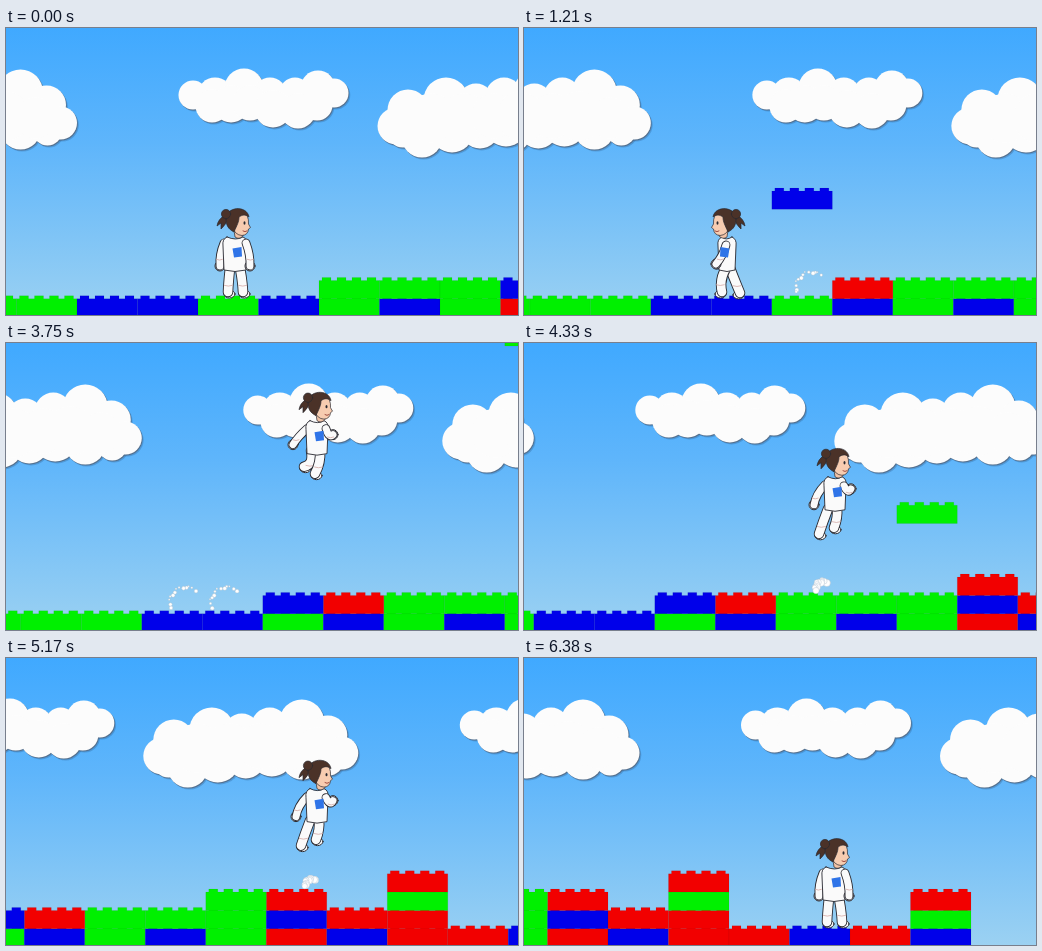
Animation, 512 px wide and 287 px high, one loop 6430 ms. Source, as an HTML page:

```html
<!DOCTYPE html>
<html lang="en">
<head>
<meta charset="utf-8">
<title>Brick runner</title>
<style>
  html, body { margin: 0; width: 100%; height: 100%; overflow: hidden; }
  svg { display: block; width: 100vw; height: 100vh; }
</style>
</head>
<body>
<svg id="stage" viewBox="0 0 512 287" preserveAspectRatio="none">
  <defs>
    <linearGradient id="sky" x1="0" y1="0" x2="0" y2="1">
      <stop offset="0" stop-color="#40a9ff"/>
      <stop offset=".4" stop-color="#5eb5fb"/>
      <stop offset="1" stop-color="#9bd1f2"/>
    </linearGradient>
    <g id="small"></g>
    <g id="large"></g>
    <path id="brick" d=""/>
  </defs>
  <rect width="512" height="287" fill="url(#sky)"/>
  <g id="world">
    <g id="clouds"></g>
    <g id="bricks"></g>
    <g id="dust" fill="#fff" stroke="#a9bccb" stroke-width=".4"></g>
    <g id="hero" stroke-linecap="round" stroke-linejoin="round"></g>
  </g>
</svg>
<script>
const LOOP = 6430, BRICK = 60.5, ROW = 18.3, BASE = 270.7, GROUND = 270, LEFT = 71;
const COLORS = { r: '#f20000', g: '#00f000', b: '#0000ea' };
const $ = id => document.getElementById(id);

function add(parent, tag, attrs) {
  const el = document.createElementNS('http://www.w3.org/2000/svg', tag);
  for (const k in attrs) el.setAttribute(k, attrs[k]);
  return parent.appendChild(el);
}
const clamp = (v, lo, hi) => Math.min(hi, Math.max(lo, v));
const mix = (a, b, k) => a + (b - a) * k;

function track(keys, t) {
  const i = keys.findIndex(k => k[0] > t);
  if (i < 0) return keys[keys.length - 1][1];
  const [t0, a] = keys[i - 1], [t1, b] = keys[i];
  return mix(a, b, (t - t0) / (t1 - t0));
}

// Clouds: overlapping puffs, repeated along the world
const SMALL = [[187,67,14],[209,67,17],[238,60,19],[264,66,16],[289,65,15],[312,60,17],
  [328,65,14],[206,78,16],[225,76,18],[244,75,17],[267,81,18],[292,83,17],[311,77,15]];
const LARGE = [[390,98,18],[402,82,20],[440,72,22],[470,74,18],[498,68,18],[530,64,22],
  [556,77,19],[570,95,16],[557,103,14],[530,101,20],[500,97,21],[474,101,19],[446,103,21],
  [416,109,20],[397,104,15],[425,90,24],[458,90,24],[488,88,22],[515,88,24],[545,90,20]];
function cloud(id, puffs) {
  const layers = [[1.8, 2, 'rgba(30,70,115,.25)'], [.8, 1, '#55718f'], [0, 0, '#fcfcfc']];
  for (const [dx, dy, fill] of layers)
    for (const [x, y, r] of puffs) add($(id), 'circle', { cx: x + dx, cy: y + dy, r: r + .5, fill });
}
cloud('small', SMALL);
cloud('large', LARGE);
for (let i = -1; i < 3; i++)
  for (const id of ['small', 'large']) add($('clouds'), 'use', { href: '#' + id, x: i * 515.5 });

// Bricks: body with four studs
let outline = `M0 ${ROW}V0`;
for (let i = 0; i < 4; i++) outline += `H${3 + i * 15}v-3h9v3`;
$('brick').setAttribute('d', outline + `H${BRICK}V${ROW}Z`);

function brick(col, row, color) {
  return add($('bricks'), 'use', {
    href: '#brick', x: LEFT + col * BRICK, y: BASE - row * ROW, fill: COLORS[color],
    stroke: 'rgba(0,0,0,.15)', 'stroke-width': .4
  });
}
const columns = 'b b g b gg bg gg rb br rrgr r b r bgr'.split(' ');
for (let col = -6; col < 0; col++) brick(col, 0, 'g');
columns.forEach((stack, col) => [...stack].forEach((c, row) => brick(col, row, c)));

const FALL = .306;
const falling = [[3, 1, 'r', 925], [2, 1, 'b', 1503], [7, 2, 'r', 2500], [6, 2, 'g', 4566]]
  .map(([col, row, color, lands]) => ({ el: brick(col, row, color), y: BASE - row * ROW, lands }));

// Movement
const path = [[0, 229], [835, 229], [1328, 123], [3180, 123], [3750, 245],
  [4330, 371], [5170, 544], [6270, 781]];
const jumps = [[3417, 270, 251.5], [4252, 251.5, 233], [5116, 233, 270]];
const puffs = [[232, 270, 835], [115, 270, 3180], [156, 270, 3370], [360, 251.5, 4252], [540, 233, 5116]];

function heightAt(t) {
  let y = GROUND, air = -1;
  for (const [start, from, to] of jumps) {
    if (t < start) break;
    const s = (t - start) / 1000, arc = from - 800 * s + 1200 * s * s;
    const flying = s < .333 || arc < to;
    y = flying ? arc : to;
    air = flying ? s : -1;
  }
  return { y, air };
}

const dots = puffs.map(() => Array.from({ length: 13 }, () => add($('dust'), 'circle', {})));
function drawDust(t) {
  puffs.forEach(([x, y, start], p) => {
    const age = (t - start) / 750, live = age >= 0 && age < 1, open = Math.min(1, age * 2);
    const spread = 5 + 11 * open;
    dots[p].forEach((dot, i) => {
      dot.setAttribute('display', live ? 'inline' : 'none');
      if (!live) return;
      const a = Math.PI * (.3 + i * .065), wobble = Math.sin(i * 4.7 + p);
      dot.setAttribute('cx', x + spread * Math.cos(a) + wobble);
      dot.setAttribute('cy', y - 5 - 5 * open - spread * Math.sin(a) + wobble * 1.2);
      dot.setAttribute('r', Math.max(.6, mix(3.4, 1.4, open) + wobble * .6));
    });
  });
}

// Poses: x,y of three joints per limb, relative to the feet
const LIMBS = ['armBack', 'legBack', 'legFront', 'armFront'];
const STAND = { lean: [0, 0], width: 12,
  armBack: [-11, -55, -16, -43, -15, -32], legBack: [-5, -30, -6.5, -17, -7, -6],
  legFront: [5, -30, 7.5, -17, 8, -6], armFront: [11, -55, 15.5, -43, 15, -32] };
const LEAP = { lean: [1, -1], width: 11,
  armBack: [-9, -54, -18, -45, -20, -34], legBack: [-6, -30, -11, -17, -15, -5],
  legFront: [3, -31, 4, -21, 0, -11], armFront: [10, -53, 14, -44, 17, -50] };
const GLIDE = { lean: [1, 2], width: 11,
  armBack: [-9, -51, -18, -43, -23, -35], legBack: [-5, -29, -2, -15, -12, -13],
  legFront: [4, -29, 5, -17, -1, -6], armFront: [10, -51, 13, -41, 17, -45] };

function walkPose(ms) {
  const s = Math.cos(ms * Math.PI * 2 / 375), lift = Math.sin(ms * Math.PI * 2 / 375);
  return { lean: [1, 0], width: 9,
    armBack: [-2, -53, -3 - 4 * s, -43, 2 + 9 * s, -34],
    legBack: [-2, -30, -2 - 5 * s, -17, -3 - 9 * s, -5 - 4 * Math.max(0, lift)],
    legFront: [2, -30, 2 + 7 * s, -18, -3 + 9 * s, -6 - 4 * Math.max(0, -lift)],
    armFront: [2, -53, 3 + 2 * s, -42, 4 + 8 * s, -34] };
}
function blend(a, b, k) {
  const out = { width: mix(a.width, b.width, k) };
  for (const part of ['lean', ...LIMBS]) out[part] = a[part].map((v, i) => mix(v, b[part][i], k));
  return out;
}

const INK = '#2a2a31', SUIT = '#fafafa', HAIR = '#4b3228';
const hero = $('hero'), limbs = {};
function addLimb(name) {
  const line = (stroke, width) => add(hero, 'path', { fill: 'none', stroke, 'stroke-width': width });
  const leg = name.startsWith('leg');
  const end = add(hero, 'ellipse', { rx: leg ? 5.5 : 5, ry: leg ? 4 : 5, fill: SUIT, stroke: INK, 'stroke-width': 1 });
  limbs[name] = { end, leg, lines: [line(INK, leg ? 10.5 : 8.8), line(SUIT, leg ? 8.7 : 7)],
    cuff: add(hero, 'path', { stroke: '#d3a9a5', 'stroke-width': .8, fill: 'none' }) };
}
LIMBS.slice(0, 3).forEach(addLimb);
const torso = add(hero, 'path', { fill: SUIT, stroke: INK, 'stroke-width': .9 });
addLimb('armFront');
const badge = add(hero, 'path', { d: 'M-2.5 -49.5L6.5 -51L7 -41.5L-1 -40.5Z', fill: '#2f74e8' });

const head = add(hero, 'g', {});
const shape = (d, fill, stroke = INK, width = .7) =>
  add(head, 'path', { d, fill, stroke, 'stroke-width': width });
shape('M-10 -83Q-17 -79 -18 -72L-14 -75L-14 -69Q-9 -73 -7 -80Z', HAIR);
shape('M-1 -68L0 -61Q4 -58 8 -62L8 -66Z', '#f2c3a6');
shape('M-2 -78Q1 -86 12 -83Q14 -78 13.5 -74L15.5 -70.5L13.5 -69Q13 -63 7 -62.5Q0 -63 -2 -70Z', '#f7ccb0');
shape('M-9 -79C-9 -92 12 -93 14 -81C10 -84 7 -83 4 -81C4 -76 2 -73 -1 -66C-7 -69 -9 -73 -9 -79Z', HAIR);
add(head, 'circle', { cx: -9, cy: -84, r: 4.6, fill: HAIR, stroke: INK, 'stroke-width': .7 });
add(head, 'ellipse', { cx: 9.5, cy: -75, rx: 1, ry: 1.7, fill: INK });
shape('M8 -67Q10 -65.5 12 -67', 'none', '#a14c40', 1);

function drawLimb(name, p) {
  const { end, leg, lines, cuff } = limbs[name], [x0, y0, x1, y1, x2, y2] = p;
  const d = `M${x0} ${y0}Q${x1} ${y1} ${x2} ${y2}`;
  lines.forEach(l => l.setAttribute('d', d));
  end.setAttribute('cx', x2 + (leg ? 1.5 : 0));
  end.setAttribute('cy', y2 + (leg ? 2 : 0));
  const mx = mix(x1, x2, .4), my = mix(y1, y2, .4), w = leg ? 4 : 3;
  cuff.setAttribute('d', `M${mx - w} ${my}Q${mx} ${my + 1.5} ${mx + w} ${my}`);
}

function drawHero(t, x) {
  const { y, air } = heightAt(t);
  const running = (t > 835 && t < 1328) || (t > 3180 && t < 6270);
  const pose = air >= 0 ? blend(LEAP, GLIDE, clamp((air - .08) / .25, 0, 1))
    : running ? walkPose(t < 2000 ? t - 835 : t - 3180) : STAND;
  const dir = t >= 835 && t < 3180 ? -1 : 1;
  hero.setAttribute('transform', `translate(${x} ${y}) scale(${dir} 1)`);
  LIMBS.forEach(name => drawLimb(name, pose[name]));
  const [lx, ly] = pose.lean, w = pose.width, move = `translate(${lx} ${ly})`;
  torso.setAttribute('d', `M${-w + 4} -61Q1 -57 ${w - 4} -61Q${w + 1} -59 ${w} -52L${w - 1} -28Q0 -25 ${1 - w} -28L${-w} -52Q${-w - 1} -59 ${4 - w} -61Z`);
  [torso, badge, head].forEach(el => el.setAttribute('transform', move));
}

function render(t) {
  const x = track(path, t);
  const camera = t < 3180 ? Math.min(0, x - 204) : Math.max(-81, x - 310);
  $('world').setAttribute('transform', `translate(${-camera} 0)`);
  for (const { el, y, lands } of falling) el.setAttribute('y', y - FALL * Math.max(0, lands - t));
  drawDust(t);
  drawHero(t, x);
}

const begin = performance.now();
function tick() {
  render((performance.now() - begin) % LOOP);
  requestAnimationFrame(tick);
}
tick();
</script>
</body>
</html>
```
